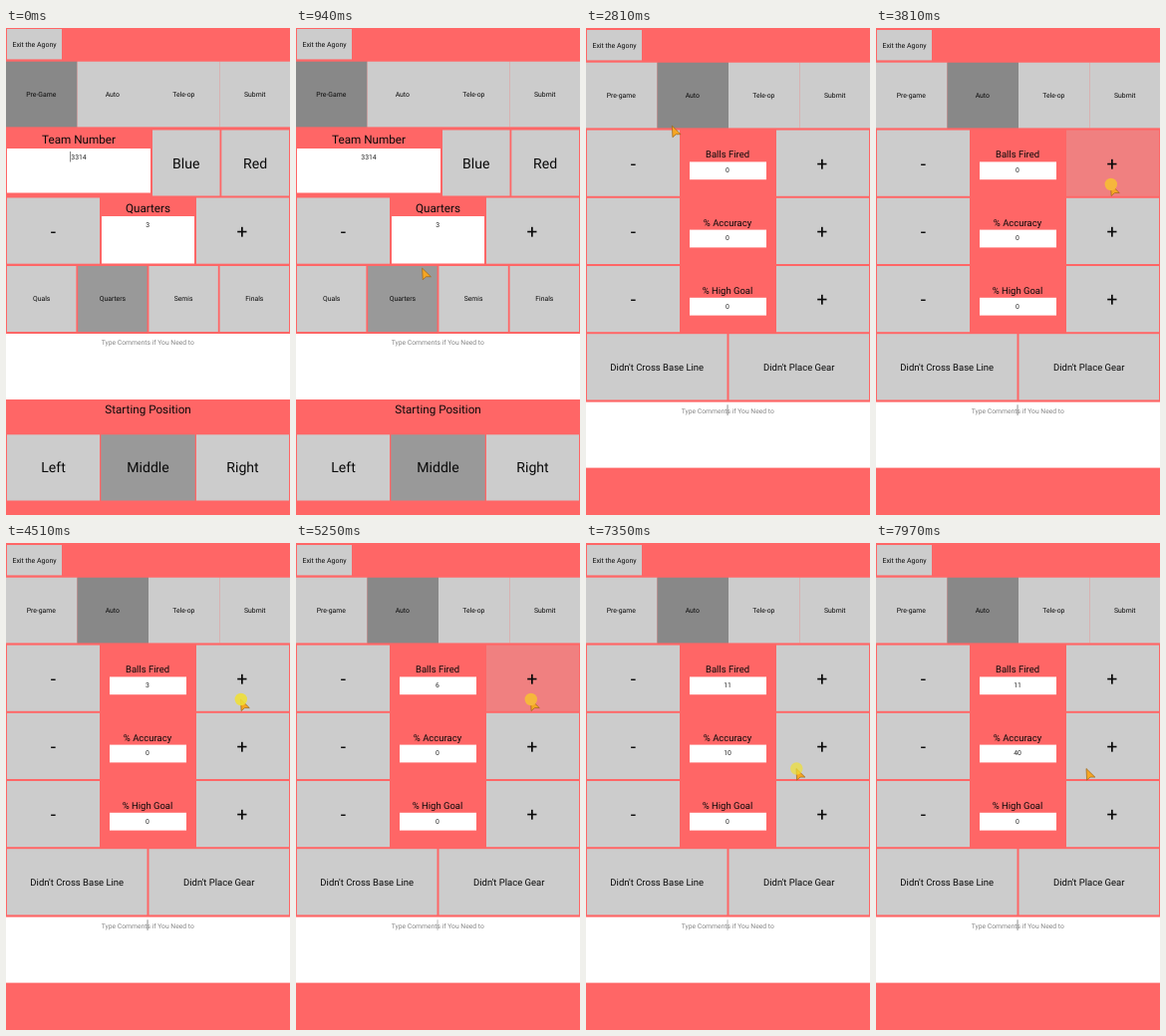
Recreate the animation shown at these times as an HTML page. Size 285 by 489 pixels, loop 8 s.

```html
<!DOCTYPE html>
<html lang="en">
<head>
<meta charset="utf-8">
<title>Scouting form</title>
<style>
  html, body { margin: 0; width: 100%; height: 100%; overflow: hidden; background: #ff6666; }
  svg { display: block; width: 100vw; height: 100vh; }
  text { font-family: Roboto, Arial, sans-serif; text-anchor: middle; text-rendering: geometricPrecision; }
</style>
</head>
<body>
<svg id="stage" viewBox="0 0 285 489" xmlns="http://www.w3.org/2000/svg"></svg>
<script>
const LOOP = 8000;
const RED = '#ff6666', GRAY = '#cccccc', PICKED = '#999999', TAB = '#888888', PRESSED = '#f08080';
const SMALL = 6.85, LABEL = 9.5, TITLE = 11.7, BIG = 14.1, SIGN = 19;
const stage = document.getElementById('stage');

function add(parent, tag, attrs, content) {
  const node = document.createElementNS('http://www.w3.org/2000/svg', tag);
  for (const key in attrs) node.setAttribute(key, attrs[key]);
  if (content !== undefined) node.textContent = content;
  parent.appendChild(node);
  return node;
}
function box(parent, x1, y1, x2, y2, fill = GRAY) {
  return add(parent, 'rect', { x: x1, y: y1, width: x2 - x1, height: y2 - y1, fill });
}
function label(parent, content, x, y, size, fill = '#0a0a0a') {
  return add(parent, 'text', { x, y, 'font-size': size, fill }, content);
}
function button(parent, content, x1, y1, x2, y2, size, fill) {
  const rect = box(parent, x1, y1, x2, y2, fill);
  label(parent, content, (x1 + x2) / 2, (y1 + y2) / 2 + size * 0.355, size);
  return rect;
}
function header(parent, dy, names, active) {
  button(parent, 'Exit the Agony', 1, 1 + dy, 56, 31.4 + dy, 6.95);
  return names.map((name, i) => {
    const x = i * 71.5;
    const rect = box(parent, x, 33.7 + dy, i === 3 ? 285 : x + 71.5, 99.4 + dy, i === active ? TAB : GRAY);
    label(parent, name, x + 35.3, 68.5 + dy, SMALL);
    return rect;
  });
}
function signs(parent, y1, y2, baseline) {
  box(parent, 1, y1, 94, y2);
  label(parent, '-', 47.5, baseline, SIGN);
  const plus = box(parent, 191, y1, 284, y2);
  label(parent, '+', 237, baseline, SIGN);
  return plus;
}
function comments(parent, y) {
  box(parent, 0, y, 285, y + 66, '#ffffff');
  label(parent, 'Type Comments if You Need to', 142.3, y + 11.2, 6.75, '#858585');
}

box(stage, 0, 0, 285, 489, RED);

// Pre-game page
const pre = add(stage, 'g', {});
const preTabs = header(pre, 0, ['Pre-Game', 'Auto', 'Tele-op', 'Submit'], 0);
label(pre, 'Team Number', 73, 116.2, TITLE);
box(pre, 1, 121, 145, 165.5, '#ffffff');
label(pre, '3314', 73, 132, SMALL, '#222222');
const teamCaret = box(pre, 64.3, 124, 65, 134.5, '#555555');
button(pre, 'Blue', 147, 102.5, 214.5, 168.5, BIG);
button(pre, 'Red', 216.3, 102.5, 284, 168.5, BIG);
signs(pre, 170.5, 236.7, 210.5);
label(pre, 'Quarters', 142.5, 184.5, TITLE);
box(pre, 96, 189, 189, 236.5, '#ffffff');
label(pre, '3', 142.3, 200.2, SMALL, '#222222');
['Quals', 'Quarters', 'Semis', 'Finals'].forEach((name, i) => {
  const x = 1 + i * 71.2;
  button(pre, name, x, 239, x + 69.4, 305, SMALL, i === 1 ? PICKED : GRAY);
});
comments(pre, 307);
label(pre, 'Starting Position', 142.5, 387, TITLE);
button(pre, 'Left', 1, 408.3, 94, 474.5, BIG);
button(pre, 'Middle', 95.3, 408.3, 189.7, 474.5, BIG, PICKED);
button(pre, 'Right', 191, 408.3, 284, 474.5, BIG);

// Auto page
const auto = add(stage, 'g', {});
header(auto, 1, ['Pre-game', 'Auto', 'Tele-op', 'Submit'], 1);
const rows = ['Balls Fired', '% Accuracy', '% High Goal'].map((name, i) => {
  const y = 102.6 + i * 68.2;
  const plus = signs(auto, y, y + 66.2, y + 40);
  label(auto, name, 142, y + 27.8, LABEL);
  box(auto, 104, y + 31.8, 181, y + 49.6, '#ffffff');
  return { plus, value: label(auto, '0', 142, y + 42.6, SMALL, '#222222') };
});
button(auto, "Didn't Cross Base Line", 1, 307.2, 141.5, 373.4, LABEL);
button(auto, "Didn't Place Gear", 143.5, 307.2, 284, 373.4, LABEL);
comments(auto, 375.6);
const noteCaret = box(auto, 141.6, 378.3, 142.5, 389, '#777777');

// Pointer
const arrow = add(stage, 'path', {
  d: 'M0 0 L8.8 8.6 L4 8.6 L0.6 11.6 Z', fill: '#f6a623',
  stroke: '#9a6418', 'stroke-width': 0.7, 'stroke-linejoin': 'round'
});
const spot = add(stage, 'circle', { r: 6.2 });

// Pointer path: time, x, y
const PATH = [
  [450, 252, 488], [600, 213, 405], [800, 152, 306], [950, 125, 237],
  [1250, 94, 150], [1400, 93, 105], [1540, 91, 74], [1670, 90, 64],
  [2550, 90, 64], [2810, 86, 98], [3000, 150, 126], [3160, 212, 148], [3290, 233, 156],
  [3390, 233, 156], [3520, 235.5, 157],
  [6250, 235.5, 157], [6420, 231, 169], [6700, 215, 215], [6860, 211, 226.5]
];
function pointerAt(t) {
  const next = PATH.findIndex(p => p[0] > t);
  if (next < 0) return PATH[PATH.length - 1].slice(1);
  const [t0, x0, y0] = PATH[Math.max(0, next - 1)], [t1, x1, y1] = PATH[next];
  const k = t1 > t0 ? Math.max(0, (t - t0) / (t1 - t0)) : 0;
  return [x0 + (x1 - x0) * k, y0 + (y1 - y0) * k];
}

// Each click: press time, release time, target rect
const SWAP = 2200;
const clickUntil = (up, target, hold = 90) => ({ down: up - hold, up, target });
const balls = [3850, 4150, 4490];
for (let i = 1; i <= 7; i++) balls.push(4490 + i * 199);
const fired = balls.map(up => clickUntil(up, rows[0].plus));
fired.push(clickUntil(6140, rows[0].plus, 200));
const accurate = [0, 1, 2, 3].map(i => clickUntil(7290 + i * 190, rows[1].plus));
const clicks = [clickUntil(SWAP, preTabs[1], 130), ...fired, ...accurate];
const FADE = 100;
const done = (list, t) => list.filter(c => c.up <= t).length;

function render(t) {
  const onAuto = t >= SWAP;
  pre.style.display = onAuto ? 'none' : '';
  auto.style.display = onAuto ? '' : 'none';
  teamCaret.style.display = t % 1000 < 500 ? '' : 'none';
  noteCaret.setAttribute('opacity', t % 1000 > 500 ? 0.9 : 0.55);

  rows[0].value.textContent = done(fired, t);
  rows[1].value.textContent = done(accurate, t) * 10;

  const [x, y] = pointerAt(t);
  arrow.style.display = t >= 450 ? '' : 'none';
  arrow.setAttribute('transform', `translate(${x} ${y})`);

  for (const rect of [preTabs[1], rows[0].plus, rows[1].plus]) rect.setAttribute('fill', GRAY);
  const click = clicks.find(c => t >= c.down && t < c.up) ||
    clicks.find(c => t >= c.up && t < c.up + FADE);
  spot.style.display = click ? '' : 'none';
  if (!click) return;
  const held = t < click.up;
  if (held) click.target.setAttribute('fill', PRESSED);
  spot.setAttribute('cx', x + 0.3);
  spot.setAttribute('cy', y);
  spot.setAttribute('fill', held ? '#f6b73c' : '#f0e034');
  spot.setAttribute('opacity', held ? 1 : 0.95 - 0.4 * (t - click.up) / FADE);
}

const start = performance.now();
function tick() {
  render((performance.now() - start) % LOOP);
  requestAnimationFrame(tick);
}
tick();
</script>
</body>
</html>
```
